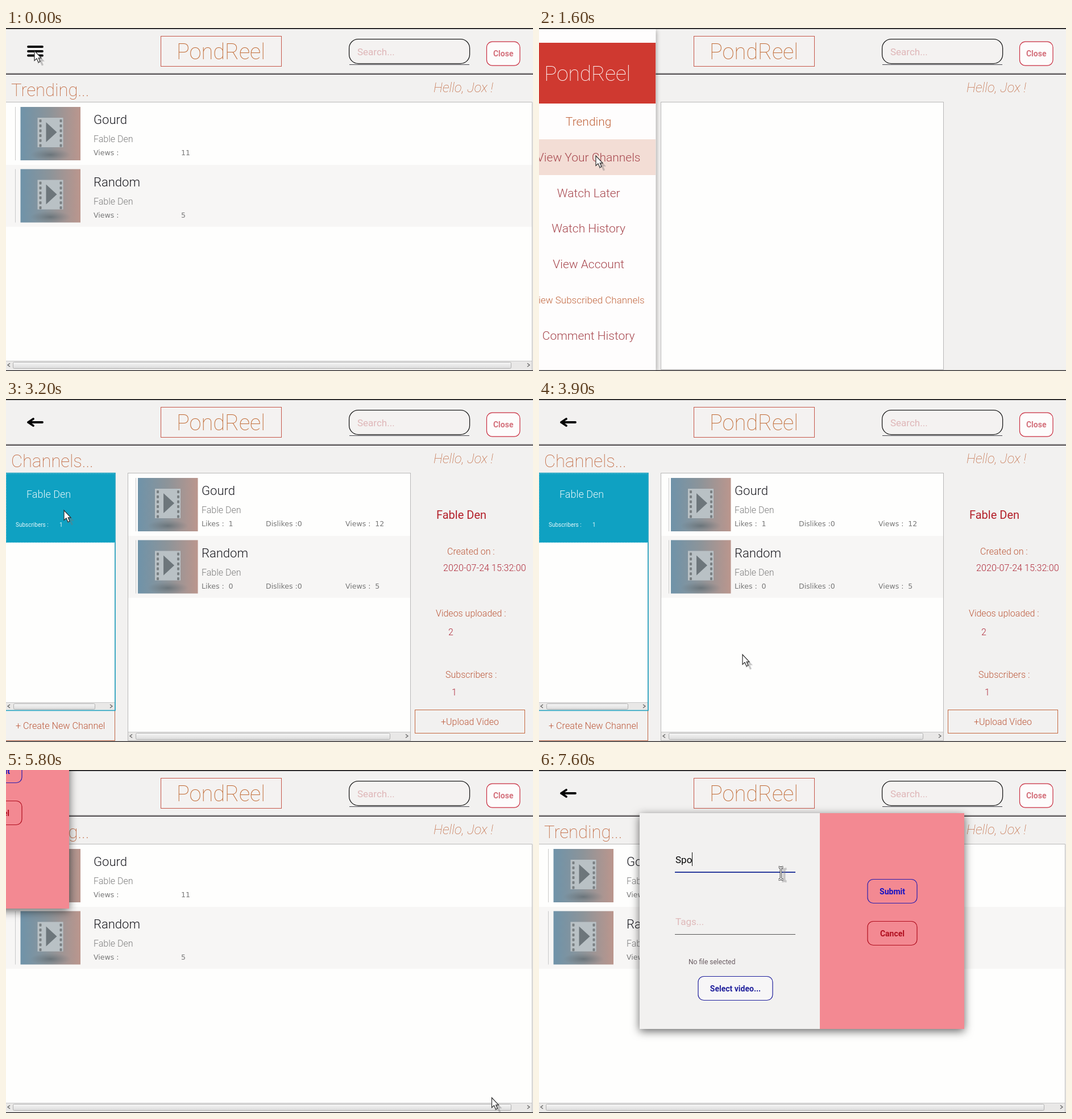
An HTML page for the animation above (8 s loop, 927 by 604 pixels).

```html
<!DOCTYPE html>
<html lang="en">
<head>
<meta charset="utf-8">
<title>Video app walkthrough</title>
<style>
  html, body { margin: 0; width: 100%; height: 100%; overflow: hidden; background: #f2f1f0; }
  svg { display: block; width: 927px; height: 604px; }
  text { font-family: Roboto, sans-serif; white-space: pre; }
  .thin { font-weight: 100; }
  .light { font-weight: 300; }
  .bold { font-weight: 700; font-size: 14px; text-anchor: middle; }
  .mid { text-anchor: middle; }
  .sys { font-family: "DejaVu Sans", sans-serif; font-size: 12.5px; fill: #777; }
</style>
</head>
<body>
<svg id="stage" viewBox="0 0 927 604"></svg>
<script>
const LOOP = 8000, STEP = 100;
const BRAND = 'PondReel', CHANNEL = 'Fable Den';
const INK = '#bd5c30';
const stage = document.getElementById('stage');

const rect = (x, y, w, h, fill, extra = '') =>
  `<rect x="${x}" y="${y}" width="${w}" height="${h}" fill="${fill}" ${extra}/>`;
const line = (x1, y1, x2, y2, color, extra = '') =>
  `<path d="M${x1} ${y1}L${x2} ${y2}" stroke="${color}" fill="none" ${extra}/>`;
const text = (x, y, str, size, fill, cls = 'light', extra = '') =>
  `<text x="${x}" y="${y}" font-size="${size}" fill="${fill}" class="${cls}" ${extra}>${str}</text>`;
const sys = (x, y, str, extra = '') => `<text x="${x}" y="${y}" class="sys" ${extra}>${str}</text>`;
const group = (id, body, extra = '') => `<g id="${id}" ${extra}>${body}</g>`;

function button(x, y, w, h, label, color, fill = 'none', ink = color) {
  return rect(x, y, w, h, fill, `rx="10" stroke="${color}" stroke-width="1.2"`) +
    text(x + w / 2, y + h / 2 + 5, label, 14, ink, 'bold');
}

function scrollbar(x, y, w, h, thumbX, thumbW) {
  const my = y + h / 2;
  const arrow = (ax, d) =>
    `<path d="M${ax - d} ${my - 3}L${ax + d} ${my}L${ax - d} ${my + 3}" fill="none" stroke="#666" stroke-width="1.3"/>`;
  return rect(x, y, w, h, '#e9e8e7') + line(x, y + .5, x + w, y + .5, '#c8c8c8') +
    rect(thumbX + .5, y + 2.5, thumbW, h - 4, 'url(#thumb)', 'rx="2" stroke="#b0b0b0"') +
    arrow(x + 5, -2) + arrow(x + w - 6, 2);
}

function thumbnail(x, y) {
  let holes = '';
  for (let i = 0; i < 6; i++)
    for (const hx of [33, 69]) holes += rect(hx, 22 + i * 8.7, 4, 5, '#7a8083', 'rx="1"');
  return `<g transform="translate(${x} ${y})">` +
    rect(0, 0, 105.5, 94, 'url(#photo)') + rect(0, 0, 105.5, 94, 'url(#floor)') +
    rect(30, 19, 45, 52, '#b9c1c5') + holes +
    '<path d="M45 27V62L64 44.5Z" fill="#6d767b"/></g>';
}

function videoRow(x, y, textX, title) {
  return line(x + .5, y + 8, x + .5, y + 102, '#c9c9c9') + thumbnail(x + (x > 100 ? 4 : 9.5), y + 8) +
    text(textX, y + 38, title, 22, '#1c1c22') + text(textX, y + 70, CHANNEL, 16, '#7d7d7d');
}

function trendingPage() {
  const row = (y, title, views) =>
    videoRow(16, y, 154, title) + sys(154, y + 93, 'Views :') + sys(308, y + 93, views);
  return rect(0, 130, 926, 472, '#fefefd') + rect(0, 241, 925, 109, '#f7f6f5') +
    '<path d="M0 130.5H925.5V602" fill="none" stroke="#b9b8b8"/>' +
    text(9, 120, 'Trending...', 31, INK, 'thin') +
    row(131, 'Gourd', 11) + row(240.5, 'Random', 5) +
    scrollbar(0, 586, 925, 15, 12, 876);
}

function channelsPage() {
  const row = (y, title, likes, views) => videoRow(228, y, 344, title) +
    sys(344, y + 93, `Likes :  ${likes}`) + sys(457, y + 93, 'Dislikes :0') +
    sys(597, y + 93, `Views :  ${views}`);
  const videos = rect(215, 241, 496, 109, '#f7f6f5') + row(131, 'Gourd', 1, 12) +
    row(240.5, 'Random', 0, 5) + scrollbar(215, 586, 496, 15, 228, 447);
  const info = text(757, 211, CHANNEL, 20, '#b3202a', '') +
    text(776, 274, 'Created on :', 16, '#bd5a3c') +
    text(769, 303, '2020-07-24 15:32:00', 16.2, '#b02c3c') +
    text(756, 383, 'Videos uploaded :', 16, '#bd5a3c') + text(778, 416, '2', 16, '#b02c3c') +
    text(773, 491, 'Subscribers :', 16, '#bd5a3c') + text(784, 522, '1', 16, '#b02c3c') +
    rect(719.5, 547.5, 193, 41, 'none', 'stroke="#c4683f"') +
    text(816, 573.5, '+Upload Video', 16, '#bd5a3c', 'light mid');
  return text(9, 120, 'Channels...', 31, INK, 'thin') +
    rect(-1, 130.5, 192.5, 418, '#fefefd', 'stroke="#b9b8b8"') +
    group('selected', rect(0, 131, 192, 122, '#0fa1c2', 'id="selFill"') +
      rect(.5, 131.5, 191, 121, 'none', 'stroke="#9fdbe8" stroke-dasharray="1 1.5"')) +
    group('listText', text(36, 174, CHANNEL, 18, 'currentColor') +
      text(17, 225, 'Subscribers :', 10, 'currentColor', '') + text(94, 225, '1', 10, 'currentColor', '')) +
    scrollbar(0, 534, 191, 14, 13, 143) +
    rect(-1, 548.5, 192.5, 53, '#f2f1f0', 'stroke="#bf6544"') +
    text(17, 581, '+ Create New Channel', 16.2, '#bd5a3c') +
    group('focusRing', '<path d="M0 130.5H192V548.5H0" fill="none" stroke="#1a9fbe" stroke-width="1.6"/>') +
    rect(214.5, 130.5, 497, 471, '#fefefd', 'stroke="#b9b8b8"') +
    group('details', videos + info);
}

function header() {
  return rect(0, 0, 927, 604, '#f2f1f0') +
    line(0, 79.5, 927, 79.5, '#bdbcbb') + line(0, 81.2, 927, 81.2, '#262024', 'stroke-width="1.6"') +
    '<path id="burger" stroke="#050505" stroke-width="3.8" stroke-linecap="round" fill="none"/>' +
    rect(272.5, 14.5, 212, 53, '#f4f2f1', 'stroke="#c5574a"') +
    text(378, 55, BRAND, 38, '#c06a34', 'thin mid') +
    rect(603.6, 19.6, 212, 43, '#f4f2f1', 'rx="16" stroke="#1d1d1d" stroke-width="1.3"') +
    line(604, 64.5, 815, 64.5, '#44444c') + text(618, 48, 'Search...', 17, '#dfb6b8', '') +
    button(845.5, 24.2, 58.5, 42, 'Close', '#c92d40', '#fdfcfc', '#d4717c');
}

function drawer() {
  const items = ['Trending', 'View Your Channels', 'Watch Later', 'Watch History',
    'View Account', 'View Subscribed Channels', 'Comment History'];
  const labels = items.map((label, i) => {
    const small = label.length > 20;
    return text(111, 172 + i * 62.8 - (small ? 1 : 0), label, small ? 17 : 21,
      i % 5 ? '#a84950' : '#c2673f', 'light mid');
  }).join('');
  return rect(0, 2, 229, 601, '#fefdfd', 'filter="url(#edge)"') +
    rect(0, 26, 229, 107, '#cf3930') + text(109, 93, BRAND, 37, '#fff', 'thin mid') +
    rect(0, 133, 229, 63, '#f3ddd5', 'id="highlight"') + labels;
}

function dialog() {
  return rect(177, 76, 571, 380, '#f2f1f0', 'filter="url(#lift)"') + rect(494, 76, 254, 380, '#f38992') +
    group('prompt', text(240, 164, 'Video Name...', 17, '#dfb9b9', '')) +
    '<text id="typed" x="240" y="164" font-size="17" fill="#080808"></text>' +
    '<path id="caret" stroke="#111" fill="none"/>' +
    line(239, 179.5, 451, 179.5, '#555') +
    '<path id="focusLine" stroke="#2b3d9d" stroke-width="2" fill="none"/>' +
    text(240, 273, 'Tags...', 17, '#dfb9b9', '') + line(239, 289.5, 451, 289.5, '#555') +
    text(263, 342, 'No file selected', 12, '#6a5c62', '') +
    button(280, 363.5, 131, 42, 'Select video...', '#20209c', '#f7f6f7') +
    button(578, 192.5, 87, 42, 'Submit', '#2a1fae', 'none', '#1212c4') +
    button(578, 266.5, 87, 42, 'Cancel', '#b00f1f');
}

function pointers() {
  const arrow = 'M0 0V17.5L4 13.8L7 20.5L10 19.2L7.2 12.8H12Z';
  const beam = 'M-4 -11Q0 -11 0 -8Q0 -11 4 -11M0 -9V9M-4 11Q0 11 0 8Q0 11 4 11';
  return group('arrow',
      `<path d="${arrow}" transform="translate(6 6)" fill="#777" opacity=".4" filter="url(#blur)"/>` +
      `<path d="${arrow}" fill="#fff" stroke="#2d2d2d" stroke-width="1.2"/>`) +
    group('beam',
      `<path d="${beam}" transform="translate(6 3)" fill="none" stroke="#888" stroke-width="4" opacity=".4"/>` +
      `<path d="${beam}" fill="none" stroke="#333" stroke-width="3.6"/>` +
      `<path d="${beam}" fill="none" stroke="#fff" stroke-width="1.6"/>`, 'transform="translate(425.5 182)"');
}

stage.innerHTML = `<defs>
  <linearGradient id="photo"><stop offset="0" stop-color="#6f93a9"/><stop offset=".5" stop-color="#8d9499"/>
    <stop offset="1" stop-color="#bb968d"/></linearGradient>
  <radialGradient id="floor" cx=".5" cy=".9" r=".34" gradientTransform="translate(0 .6) scale(1 .33)">
    <stop offset="0" stop-color="#48555c" stop-opacity=".5"/><stop offset="1" stop-color="#5c666b" stop-opacity="0"/></radialGradient>
  <linearGradient id="thumb" x2="0" y2="1"><stop offset="0" stop-color="#f6f6f6"/><stop offset="1" stop-color="#dcdcdc"/></linearGradient>
  <filter id="edge" x="-10%" y="-10%" width="120%" height="120%"><feDropShadow dx="0" dy="2" stdDeviation="4" flood-opacity=".45"/></filter>
  <filter id="lift" x="-10%" y="-10%" width="120%" height="120%"><feDropShadow dx="0" dy="4" stdDeviation="8" flood-opacity=".6"/></filter>
  <filter id="blur" x="-30%" y="-30%" width="160%" height="160%"><feGaussianBlur stdDeviation=".7"/></filter>
</defs>` + header() + group('trending', trendingPage()) + group('channels', channelsPage()) +
  text(752, 112.5, 'Hello, Jox !', 23.5, INK, 'thin', 'font-style="italic"') +
  group('drawer', drawer()) + rect(0, 0, 927, 1.8, '#1b191a') + group('dialog', dialog()) +
  rect(0, 602.6, 927, 1.4, '#2b282a') + pointers();

const part = {};
stage.querySelectorAll('[id]').forEach(el => part[el.id] = el);

const show = (name, on) => part[name].setAttribute('display', on ? 'inline' : 'none');
const move = (name, x, y) => part[name].setAttribute('transform', `translate(${x} ${y})`);
const ramp = (t, from, to) => Math.min(1, Math.max(0, (t - from) / (to - from)));
const ease = p => p * p * (3 - 2 * p);
const latest = (keys, t) => keys.reduce((found, key) => key[0] <= t ? key : found);

// Time, x, y of each pointer stop.
const PATH = [
  [0, 50, 40], [400, 49, 47], [1100, 170, 160], [1200, 294, 270], [1500, 100, 225],
  [2200, 118, 231], [2300, 136, 237], [2500, 120, 218], [2600, 107, 202], [2800, 102, 196],
  [3900, 358, 450], [4000, 600, 540], [4100, 770, 577], [4200, 133, 572], [4500, 172, 577],
  [4900, 330, 572], [5000, 520, 572], [5100, 700, 575], [5200, 820, 577], [5300, 854.5, 577],
  [6100, 740, 480], [6200, 590, 330], [6300, 470, 230], [6400, 430, 198], [6500, 424, 192]
];
const TYPED = [[0, ''], [7100, 'S'], [7500, 'Sp'], [7600, 'Spo']];

function drawBurger(p) {
  const mix = (a, b) => a + (b - a) * p;
  part.burger.setAttribute('d', `M39 ${mix(33, 41)}L${mix(64, 48)} ${mix(33, 35)}` +
    `M39 41H64M39 ${mix(48.5, 41)}L${mix(64, 48)} ${mix(48.5, 47)}`);
}

function render(now) {
  const t = Math.floor(now % LOOP / STEP) * STEP;
  const onChannels = t >= 1600 && t < 5600;
  show('channels', onChannels);
  show('trending', !onChannels);
  drawBurger(ease(ramp(t, 300, 700)));

  const open = ease(ramp(t, 300, 900)) - ease(ramp(t, 1500, 2000));
  show('drawer', open > 0);
  move('drawer', -229 * (1 - open), 0);
  part.highlight.setAttribute('y', t < 1500 ? 133 : 196);

  const picked = t >= 3100, focused = picked && t < 5400;
  show('selected', picked);
  show('focusRing', focused);
  part.selFill.setAttribute('fill', focused ? '#0fa1c2' : '#d3d3d3');
  part.listText.setAttribute('color', focused ? '#e6f7fa' : '#2b2b33');
  show('details', t >= 3200);

  const arriving = t < 5900;
  show('dialog', t >= 5800);
  move('dialog', arriving ? -637 : 0, arriving ? -212 : 0);
  const value = latest(TYPED, t)[1];
  part.typed.textContent = value;
  show('prompt', !value);
  const caretX = Math.round(240 + (value ? part.typed.getComputedTextLength() : 0)) + .5;
  part.caret.setAttribute('d', `M${caretX} 145V169`);
  show('caret', t >= 6500);
  const half = 106 * ramp(t, 6300, 6500);
  part.focusLine.setAttribute('d', `M${345 - half} 180H${345 + half}`);

  const [, x, y] = latest(PATH, t);
  move('arrow', x, y);
  show('arrow', t < 6700);
  show('beam', t >= 6700);
}

let start;
function tick(now) {
  start ??= now;
  render(now - start);
  requestAnimationFrame(tick);
}
render(0);
requestAnimationFrame(tick);
</script>
</body>
</html>
```
